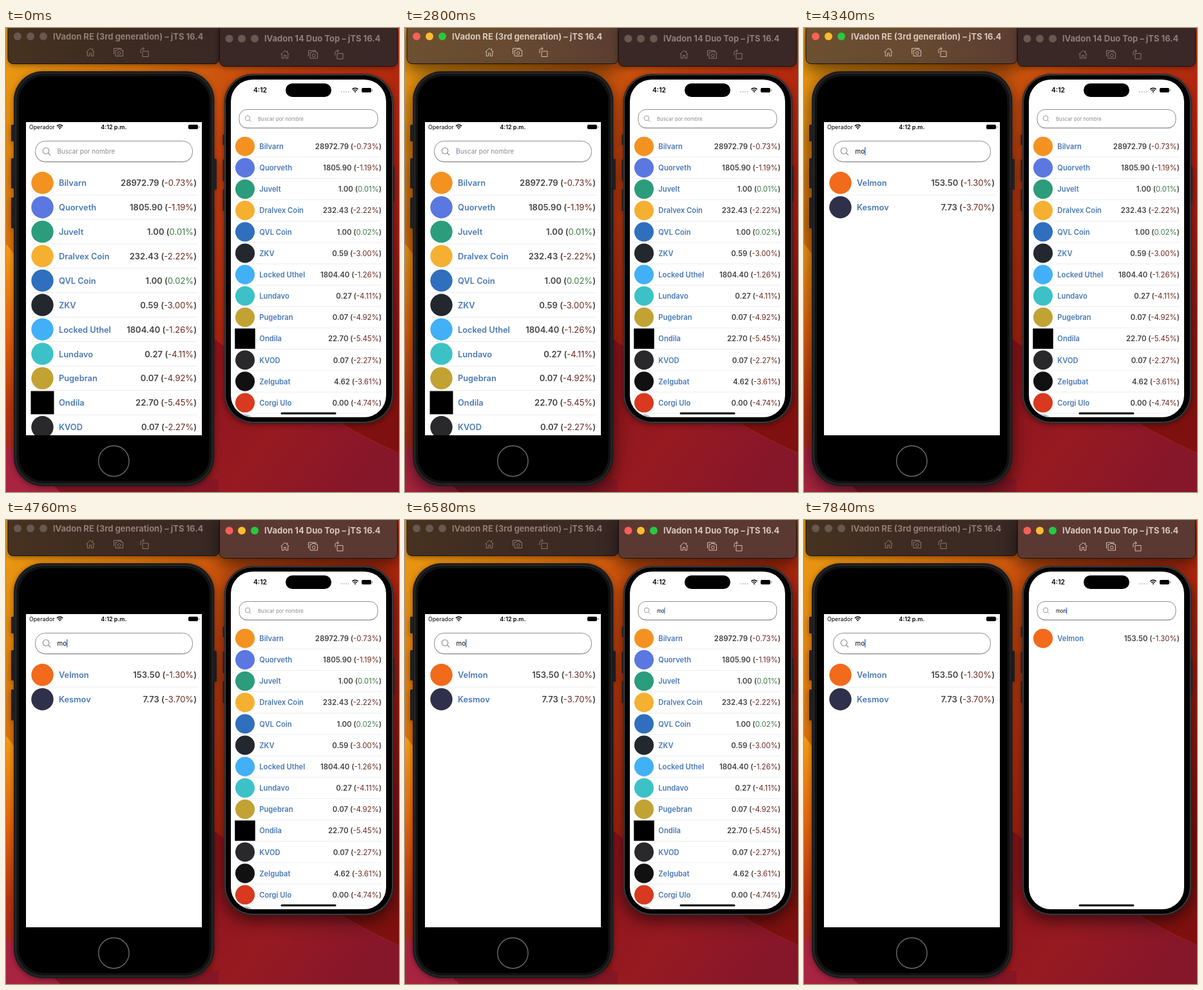
These frames come from a looping animation (610 px wide and 720 px high, 8000 ms). An HTML page:

```html
<!DOCTYPE html>
<html lang="es">
<head>
<meta charset="utf-8">
<title>Coin search</title>
<style>
html, body { margin: 0; height: 100%; overflow: hidden; background: #a01c14; }
svg { display: block; width: 100vw; height: 100vh; font-family: Inter, Roboto, sans-serif; }
.shadow { filter: drop-shadow(0 2px 4px rgba(0,0,0,.4)); }
.on .shadow { filter: drop-shadow(0 8px 13px rgba(0,0,0,.58)); }
.title { font-weight: 700; font-size: 13px; fill: #8e7e76; }
.on .title { fill: #d6c8bf; }
.tool { fill: none; stroke: #87776f; stroke-width: 1; stroke-linejoin: round; }
.on .tool { stroke: #cdbdb2; }
.light { fill: #68584f; }
.on .l0 { fill: #fb5f57; }
.on .l1 { fill: #fdbc2e; }
.on .l2 { fill: #28c840; }
.left .bar { fill: url(#barL); }
.left.on .bar { fill: url(#barLOn); }
.right .bar { fill: #3a2826; }
.right.on .bar { fill: #5b3933; }
.bar { stroke: #1c1210; stroke-width: 1; }
.name { font-weight: 600; font-size: 12.8px; fill: #4a7ab4; }
.price { font-size: 13px; font-weight: 600; fill: #434343; text-anchor: end; }
.price tspan { font-weight: 400; }
.down { fill: #6c2a22; }
.up { fill: #3e7b49; }
.hint { fill: #8b8b8b; }
.bold { font-weight: 600; }
</style>
</head>
<body>
<svg id="stage" viewBox="0 0 610 720" preserveAspectRatio="none"></svg>
<script>
const COINS = [
  ['Bilvarn', '28972.79', '-0.73', '#f39221'],
  ['Quorveth', '1805.90', '-1.19', '#5a78e0'],
  ['Juvelt', '1.00', '0.01', '#2b9c7c'],
  ['Dralvex Coin', '232.43', '-2.22', '#f5b032'],
  ['QVL Coin', '1.00', '0.02', '#2f6fbd'],
  ['ZKV', '0.59', '-3.00', '#23272e'],
  ['Locked Uthel', '1804.40', '-1.26', '#42b0f7'],
  ['Lundavo', '0.27', '-4.11', '#3cc2c6'],
  ['Pugebran', '0.07', '-4.92', '#c2a233'],
  ['Ondila', '22.70', '-5.45', '#000'],
  ['KVOD', '0.07', '-2.27', '#29292c'],
  ['Zelgubat', '4.62', '-3.61', '#111'],
  ['Corgi Ulo', '0.00', '-4.74', '#d8391f'],
  ['Altrun', '80.12', '-1.84', '#b9bcc0'],
  ['Velmon', '153.50', '-1.30', '#f26a1b'],
  ['Kesmov', '7.73', '-3.70', '#2e3149'],
];
const SQUARE = 9, PITCH = 37.9;

const rect = (x, y, w, h, r, attrs = '') =>
  `<rect x="${x}" y="${y}" width="${w}" height="${h}" rx="${r}" ${attrs}/>`;
const text = (x, y, s, cls, attrs = '') =>
  `<text x="${x}" y="${y}" class="${cls}" ${attrs}>${s}</text>`;
const at = (x, y, k, body, attrs = '') =>
  `<g transform="translate(${x} ${y}) scale(${k})" ${attrs}>${body}</g>`;

function titleBar(x, y, w, h, dots, titleX, toolX, title) {
  const lights = dots.map((cx, i) => `<circle cx="${cx}" cy="${y + 13}" r="6" class="light l${i}"/>`).join('');
  const home = 'M-6.5 0L0-6L6.5 0M-4.7-1V6H-1.4V1.5H1.4V6H4.7V-1M3.6-5.8V-3';
  const shot = 'M-7 3V-6H4.5V-4M-4.5-3H-2L-1-4.5H3L4-3H7V6H-4.5Z';
  const turn = 'M-3-1.5H6V7H-3ZM-6 1.5V-3Q-6-5.5-3-5.5H-1M-3-8L-.7-5.5L-3-3';
  const tools = at(toolX, y + 37.5, 1, `<path d="${home}"/>`) +
    at(toolX + 43.5, y + 37.5, 1, `<path d="${shot}"/><circle cx="1.3" cy="1.5" r="2.3"/>`) +
    at(toolX + 84, y + 37.5, 1, `<path d="${turn}"/>`);
  return `<g class="shadow">${rect(x, y - 8, w, h + 8, 8, 'class="bar"')}</g>${lights}` +
    text(titleX, y + 17.5, title, 'title') + `<g class="tool">${tools}</g>`;
}

const wifi = (x, y, k) => at(x, y, k,
  `<path d="M-5-.8A7 7 0 0 1 5-.8M-3 1.4A4.3 4.3 0 0 1 3 1.4" fill="none" stroke="#000" stroke-width="1.7"/>
   <path d="M-1.6 3L0 4.6L1.6 3A2.3 2.3 0 0 0-1.6 3"/>`);

const battery = (x, y) => rect(x, y, 15, 7, 2) + rect(x + 16, y + 2.2, 1.3, 2.6, .6, 'fill="#777"');

function search(x, y, w, h, r, k) {
  const my = y + h / 2;
  return rect(x, y + 1, w, h, r, 'fill="#b4b4b4"') +
    rect(x, y, w, h, r, 'fill="#fff" stroke="#8f8f8f" stroke-width="1"') +
    at(x + 17.5 * k, my, k, '<circle cx="-1" cy="-1" r="4.8"/><path d="M2.5 2.5L6 6"/>',
      'fill="none" stroke="#8d8d8d" stroke-width="1.1"') +
    at(x + 34 * k + 2 * (1 - k) * 5, my + 3.6 * k, k,
      text(0, 0, 'Buscar por nombre', 'hint', 'font-size="9.9"') +
      text(0, 0, '', 'typed', 'font-size="9.9"') +
      rect(0, -10, 1.3, 12.5, .5, 'class="caret" fill="#2f62dd"')) +
    at(x + w - 18.5 * k, my, k,
      '<path d="M-3.8-3.8L3.8 3.8M3.8-3.8L-3.8 3.8" stroke="#2b8fdc" stroke-width="1.5"/>', 'class="clear"');
}

function row([name, price, change, color], i, end) {
  const icon = i === SQUARE ? rect(-18, -18, 36, 36, 0, `fill="${color}"`)
    : `<circle r="17.2" fill="${color}"/>`;
  const tone = change < 0 ? 'down' : 'up';
  return `<g class="row"><path d="M-17-19H${end + 1}" stroke="#ebebeb"/>${icon}` +
    text(25.5, 4.9, name, 'name') +
    text(end, 4.9, `${price} (<tspan class="${tone}">${change}%</tspan>)`, 'price') + '</g>';
}

const list = (x, y, k, end) => at(x, y, k, COINS.map((c, i) => row(c, i, end)).join(''));

const wallpaper = `
  <rect width="610" height="720" fill="url(#sky)"/>
  <path d="M0 335Q60 400 110 720H0Z" fill="url(#flare)"/>
  <path d="M322 481Q487 605 610 660V720H322Z" fill="url(#wine)"/>
  <path d="M322 481Q487 605 610 660" fill="none" stroke="#c22a26" opacity=".5"/>
  <path d="M50 690L330 700V720H84Z" fill="#861626"/>
  <path d="M0 648Q40 676 84 720H0Z" fill="#a82440"/>`;

const gradient = (id, dir, ...stops) => `<linearGradient id="${id}" ${dir}>` +
  stops.map((c, i) => `<stop offset="${i / (stops.length - 1)}" stop-color="${c}"/>`).join('') + '</linearGradient>';

const defs = `<defs>
  ${gradient('sky', 'gradientUnits="userSpaceOnUse" x1="0" y1="0" x2="610" y2="480"',
    '#eea012', '#d9740d', '#c23e0d', '#aa1f0f', '#7e110f')}
  ${gradient('flare', 'x2="0" y2="1"', '#f59c14', '#e4660d', '#b5330f', '#96202a')}
  ${gradient('wine', 'x2="1" y2=".6"', '#8c131a', '#971a21', '#86162a')}
  ${gradient('barL', '', '#463220', '#3d2b22', '#392824')}
  ${gradient('barLOn', '', '#6c5030', '#674a30', '#5b3d31')}
  <clipPath id="screenL"><rect x="31" y="146" width="273" height="486"/></clipPath>
  <clipPath id="screenR"><rect x="349" y="80" width="241" height="524" rx="34"/></clipPath>
</defs>`;

const button = (x, y, h) => rect(x, y, 5, h, 1.5, 'fill="#202022"');

const left = `<g class="left">
  ${titleBar(3, 0, 328, 55.5, [18, 38, 58], 73, 131, 'lVadon RE (3rd generation) – jTS 16.4')}
  <g class="shadow">
    ${button(8, 150, 26)}${button(8, 202, 47)}${button(8, 263, 48)}${button(322, 203, 48)}
    ${rect(12, 67, 311.5, 644, 45, 'fill="#1d1d1f"')}
  </g>
  ${rect(15.5, 70.5, 304.5, 637, 42, 'fill="#111112" stroke="#303032"')}
  ${rect(20, 75, 295.5, 628, 38)}
  <circle cx="167.3" cy="672" r="23.7" fill="none" stroke="#6a6a6a" stroke-width="1.4"/>
  <g clip-path="url(#screenL)">
    <rect x="31" y="146" width="273" height="486" fill="#fff"/>
    ${text(36, 157, 'Operador', '', 'font-size="8.8"')}
    ${wifi(83.5, 153, .92)}
    ${text(167.3, 157, '4:12 p.m.', 'bold', 'font-size="9" text-anchor="middle"')}
    ${battery(283, 150)}
    ${search(45.5, 175.5, 244, 32, 15, 1)}
    ${list(56.5, 240.3, 1, 239.5)}
  </g></g>`;

const right = `<g class="right">
  ${titleBar(331.5, 3.5, 276, 56, [346.5, 366, 386], 401, 433, 'lVadon 14 Duo Top – jTS 16.4')}
  <g class="shadow">
    ${button(336.5, 165, 17)}${button(336.5, 204, 34)}${button(336.5, 250, 34)}${button(598, 214, 56)}
    ${rect(338.5, 71, 263, 542.5, 45, 'fill="#2c2c2f"')}
  </g>
  ${rect(340.5, 73, 259, 538.5, 43, 'stroke="#56565a" stroke-width=".8"')}
  <g clip-path="url(#screenR)">
    <rect x="349" y="80" width="241" height="524" fill="#fff"/>
    ${text(384, 100.3, '4:12', 'bold', 'font-size="10.3"')}
    ${rect(434, 86, 71, 21, 10.5)}
    ${[521, 524.6, 528.2, 531.8].map(x => `<circle cx="${x}" cy="99" r="1" fill="#bbb"/>`).join('')}
    ${wifi(542, 96, .92)}
    ${battery(552, 93)}
    ${search(362, 126.5, 215, 28.5, 12, .79)}
    ${list(371, 183.7, .8747, 242.3)}
    ${rect(426.5, 596.5, 86, 3, 1.5)}
  </g></g>`;

const stage = document.getElementById('stage');
stage.innerHTML = defs + wallpaper + left + right;

// Each phone: when it gains and loses focus, when it is tapped, what is typed and when the list reacts.
const phones = [
  { side: 'left', focus: [910, 4760], tap: 1120, solid: 3290, clear: 3220,
    keys: [[3010, 'm'], [3220, 'mo']], filters: [[3290, 'mo']] },
  { side: 'right', focus: [4760, 8000], tap: 5530, solid: 6790, clear: 6510,
    keys: [[6370, 'm'], [6510, 'mo'], [6650, 'mon']], filters: [[6650, 'mo'], [6720, 'mon']] },
];
for (const p of phones) {
  p.el = stage.querySelector('.' + p.side);
  for (const part of ['hint', 'typed', 'caret', 'clear']) p[part] = p.el.querySelector('.' + part);
  p.rows = [...p.el.querySelectorAll('.row')];
}

const clamp = v => Math.min(1, Math.max(0, v));
const latest = (steps, t) => steps.reduce((value, [start, s]) => t >= start ? s : value, '');
const show = (el, on) => el.style.display = on ? '' : 'none';

// Caret cycle: lit, fade out, dark, fade in.
function blink(age) {
  const p = age < 0 ? 0 : age % 1050;
  return p < 770 ? clamp((680 - p) / 190) : clamp((p - 840) / 210);
}

function filter(p, query) {
  if (p.query === query) return;
  p.query = query;
  let n = 0;
  p.rows.forEach((el, i) => {
    const match = COINS[i][0].toLowerCase().includes(query);
    show(el, match);
    if (!match) return;
    show(el.firstChild, n > 0);
    el.setAttribute('transform', `translate(0 ${n++ * PITCH})`);
  });
}

function draw(t) {
  for (const p of phones) {
    const typed = latest(p.keys, t);
    p.el.classList.toggle('on', t >= p.focus[0] && t < p.focus[1]);
    if (p.typed.textContent !== typed) p.typed.textContent = typed;
    show(p.hint, !typed);
    show(p.clear, t >= p.clear);
    p.caret.setAttribute('x', typed ? p.typed.getComputedTextLength() : 0);
    p.caret.setAttribute('opacity', t < p.tap ? 0 : blink(t - (typed ? p.solid : p.tap)));
    filter(p, latest(p.filters, t));
  }
}

const start = performance.now();
function tick() {
  draw((performance.now() - start) % 8000);
  requestAnimationFrame(tick);
}
tick();
</script>
</body>
</html>
```
